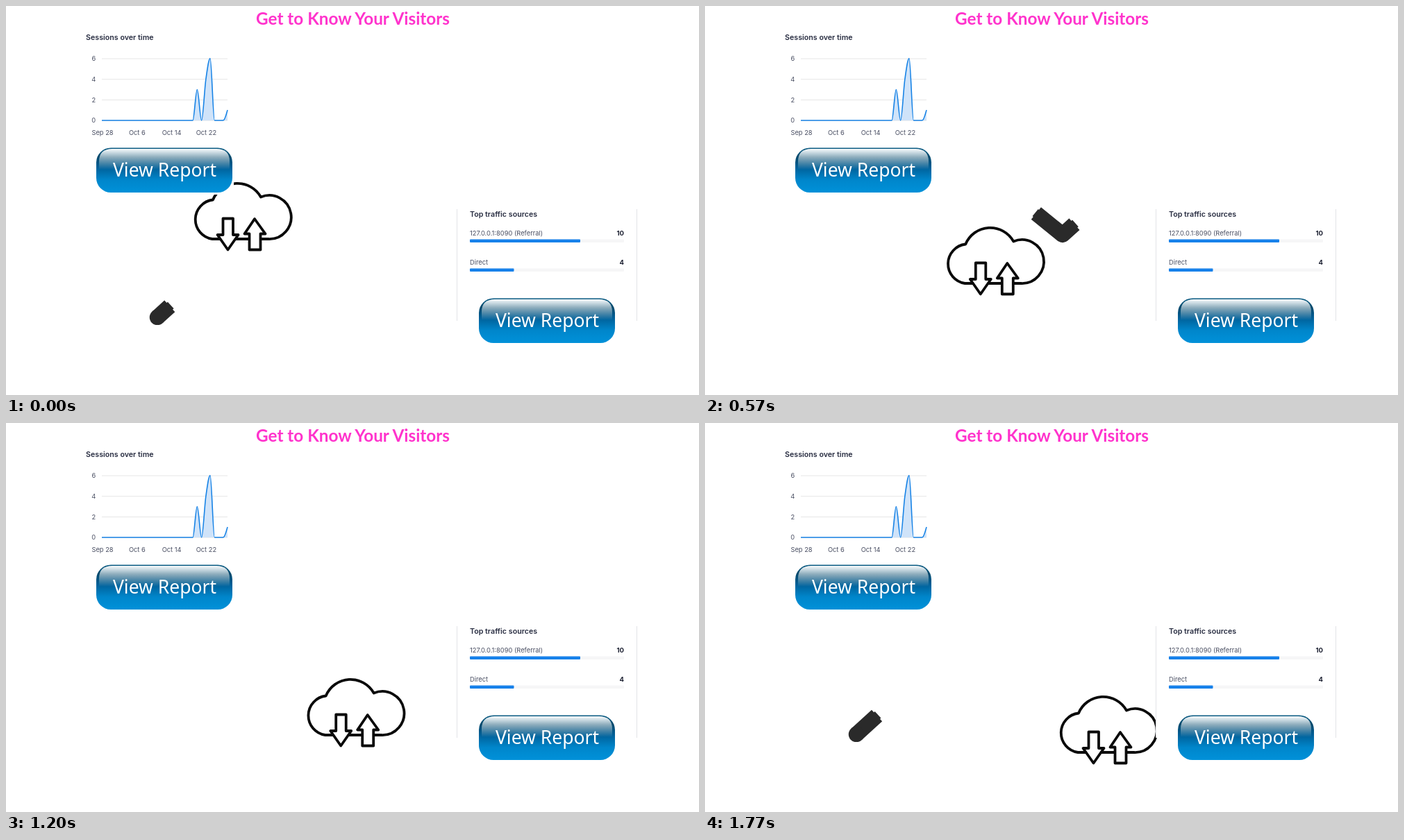
Write an HTML page that moves like this. It is 998 px wide and 561 px high and loops after 1.8 s.

```html
<!DOCTYPE html>
<html lang="en">
<head>
<meta charset="utf-8">
<title>Get to Know Your Visitors</title>
<style>
html, body { margin: 0; width: 100%; height: 100%; overflow: hidden; background: #fff; }
svg { display: block; width: 100%; height: 100%; }
text { font-family: Inter, sans-serif; font-size: 9.3px; fill: #4a4f63; }
.mid { text-anchor: middle; }
.end { text-anchor: end; }
.bold { font-size: 10.7px; font-weight: 600; fill: #272c40; }
.count { font-size: 9.6px; font-weight: 700; fill: #1e2233; }
.title { font: 700 24.3px Lato, sans-serif; fill: #ff33cc; }
.label { font: 26.5px "Noto Sans", sans-serif; fill: #fff; }
.cloud { fill: none; stroke: #0a0a0a; stroke-width: 3.8; stroke-linejoin: round; }
.arrow { fill: #fff; }
</style>
</head>
<body>
<svg viewBox="0 0 998 561">
  <defs>
    <linearGradient id="base" x2="0" y2="1">
      <stop offset="0" stop-color="#0b5c84"/>
      <stop offset=".2" stop-color="#03486b"/>
      <stop offset=".45" stop-color="#00619a"/>
      <stop offset=".72" stop-color="#0086cb"/>
      <stop offset="1" stop-color="#0091d9"/>
    </linearGradient>
    <linearGradient id="gloss" x2="0" y2="1">
      <stop offset="0" stop-color="#fff" stop-opacity=".97"/>
      <stop offset=".4" stop-color="#fff" stop-opacity=".55"/>
      <stop offset="1" stop-color="#fff" stop-opacity="0"/>
    </linearGradient>
    <clipPath id="frame"><rect x="206" y="105" width="559" height="355"/></clipPath>
    <g id="button">
      <rect x="124" y="200" width="204" height="72" fill="#fff"/>
      <rect x="130" y="204.500" width="196" height="64.500" rx="21" fill="url(#base)"/>
      <path d="M134 236V224Q134 206 153 206H303Q322 206 322 224V236Z" fill="url(#gloss)"/>
      <text class="label mid" x="228.500" y="246">View Report</text>
    </g>
  </defs>

  <text class="title mid" x="499.500" y="26.500">Get to Know Your Visitors</text>

  <g id="ribbon" clip-path="url(#frame)" fill="#2a2a2a" stroke="#2a2a2a">
    <path id="track" d="M218 449L427 258.500L515 330L753 115" fill="none" stroke-width="22.500" stroke-linejoin="round"/>
    <path id="bulge" d="M218 449L427 258.500L515 330L753 115" fill="none" stroke-width="13" stroke-linejoin="round"/>
    <circle id="startCap" cx="218" cy="449" r="11.250" stroke="none"/>
    <circle id="endCap" cx="753" cy="115" r="11.250" stroke="none"/>
  </g>

  <g id="cloud" class="cloud">
    <path d="M297 336A28.500 28.500 0 0 1 298 279.500A38.400 38.400 0 0 1 367 275.500A31.500 31.500 0 1 1 378 336Z"/>
    <path class="arrow" d="M312.500 306.500H327V330H334.500L319.500 351.500L304.500 330H312.500Z"/>
    <path class="arrow" d="M350.500 351.500H366.500V328.500H373.500L358 307L343.500 328.500H350.500Z"/>
  </g>

  <text class="bold" x="115" y="49">Sessions over time</text>
  <g id="axes"></g>
  <path d="M138 165H269C271 165 273.200 120.500 275.300 120.500S279.500 165 281.600 165S285.700 121 287.800 106S291.900 75.500 294 75.500S298.200 165 300.300 165H312.800C315 165 317 157 319 150V165Z" fill="#cfe3f9"/>
  <path d="M138 165H269C271 165 273.200 120.500 275.300 120.500S279.500 165 281.600 165S285.700 121 287.800 106S291.900 75.500 294 75.500S298.200 165 300.300 165H312.800C315 165 317 157 319 150" fill="none" stroke="#1783e6" stroke-width="1.600"/>
  <use href="#button"/>

  <rect x="649" y="293" width="260" height="161" fill="#fff"/>
  <path d="M649.500 293V454M908.500 293V454" stroke="#e2e4e8"/>
  <text class="bold" x="668" y="304">Top traffic sources</text>
  <g id="sources"></g>
  <use href="#button" x="551" y="217"/>
</svg>
<script>
const $ = id => document.getElementById(id);

$("axes").innerHTML =
  [6, 4, 2, 0].map((n, i) => {
    const y = 76 + i * 29.7;
    return `<path d="M138 ${y}H319" stroke="#e6e6e6"/><text class="mid" x="126.300" y="${y + 3.3}">${n}</text>`;
  }).join("") +
  ["Sep 28", "Oct 6", "Oct 14", "Oct 22"].map((day, i) =>
    `<text class="mid" x="${139 + i * 49.8}" y="186.300">${day}</text>`).join("");

$("sources").innerHTML =
  [["127.0.0.1:8090 (Referral)", 10, 159], ["Direct", 4, 63.5]].map(([name, count, width], i) => {
    const y = 330.5 + i * 42;
    return `<text x="668" y="${y}">${name}</text><text class="count end" x="890" y="${y}">${count}</text>
      <rect x="668" y="${y + 6}" width="222" height="4.500" rx="1" fill="#f6f6f7"/>
      <rect x="668" y="${y + 6}" width="${width}" height="4.500" rx="1" fill="#1781ea"/>`;
  }).join("");

// Smooth curve through [time, value] points, held at both ends
function curve(points) {
  const last = points.length - 1;
  const slope = i => {
    const [t0, v0] = points[Math.max(i - 1, 0)], [t1, v1] = points[Math.min(i + 1, last)];
    return (v1 - v0) / (t1 - t0);
  };
  return t => {
    if (t <= points[0][0]) return points[0][1];
    if (t >= points[last][0]) return points[last][1];
    const i = points.findIndex(p => p[0] > t) - 1;
    const [t0, v0] = points[i], [t1, v1] = points[i + 1];
    const d = t1 - t0, u = (t - t0) / d, w = 1 - u;
    return v0 * w * w * (1 + 2 * u) + v1 * u * u * (3 - 2 * u)
      + d * u * w * (w * slope(i) - u * slope(i + 1));
  };
}

const LOOP = 1800, STEP = 30, RIBBON_CYCLE = 1740;
const drop = curve([[0, 0], [330, 21], [570, 64], [930, 105], [1200, 114], [1440, 122], [1770, 139]]);
const head = curve([[-60, 0], [0, 25], [30, 41], [330, 333], [540, 409], [570, 420], [850, 717]]);
const tail = curve([[90, 0], [330, 242], [570, 347], [900, 717]]);
const length = $("track").getTotalLength();

function dash(path, from, to) {
  const start = Math.max(from, 0);
  path.setAttribute("stroke-dasharray", `0 ${start} ${Math.max(to - start, 0)} 2000`);
}

const show = (node, on) => node.setAttribute("visibility", on ? "inherit" : "hidden");

function draw(t) {
  $("cloud").setAttribute("transform", `translate(${t * 240 / 1770} ${drop(t)})`);
  const time = t >= 1650 ? t - RIBBON_CYCLE : t;
  const a = tail(time), b = head(time);
  $("ribbon").setAttribute("visibility", b > 0 && a < length - 1 ? "visible" : "hidden");
  dash($("track"), a, b - 1);
  dash($("bulge"), a - 1.5, b + 1);
  show($("startCap"), a <= 0);
  show($("endCap"), b >= length - 1);
}

const began = performance.now();
function tick() {
  const t = (performance.now() - began) % LOOP;
  draw(Math.floor(t / STEP) * STEP);
  requestAnimationFrame(tick);
}
tick();
</script>
</body>
</html>
```
